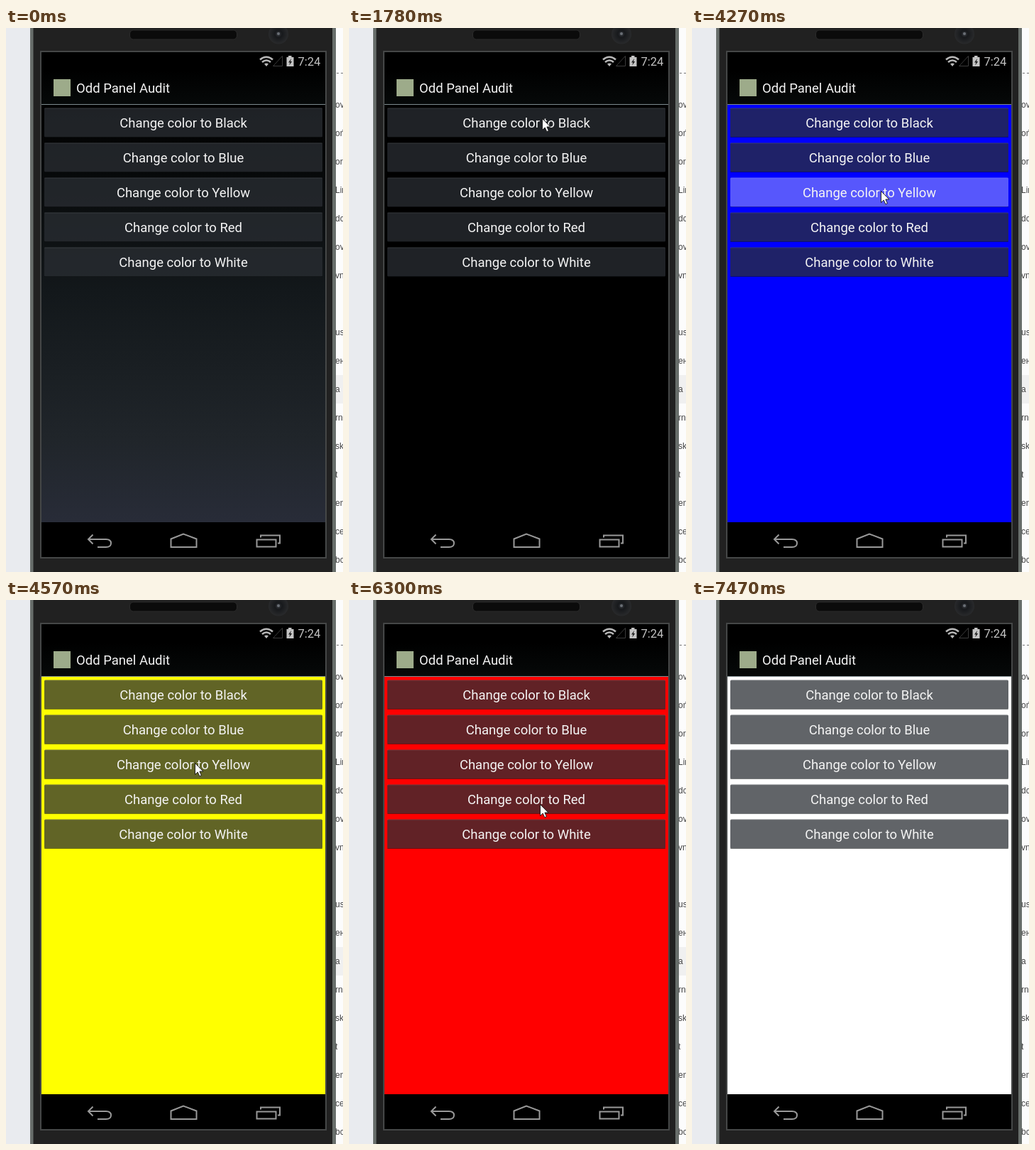
An HTML page that plays this animation: 475 by 765 pixels, repeating every 8380 ms.

```html
<!DOCTYPE html>
<html lang="en">
<head>
<meta charset="utf-8">
<title>Screen colour check</title>
<style>
  html, body { margin: 0; width: 100%; height: 100%; overflow: hidden; background: #e9ebef; }
  svg { display: block; width: 475px; height: 765px; }
  .ui { font-family: Roboto, "Noto Sans", sans-serif; font-size: 18.5px; fill: #f4f4f4; }
  .side { font-family: "Liberation Sans", Arial, sans-serif; font-size: 12px; fill: #444; }
  .nav { fill: none; stroke: #999; stroke-width: 2; }
</style>
</head>
<body>
<svg viewBox="0 0 475 765">
  <defs>
    <linearGradient id="night" x1="0" y1="0" x2="0" y2="1">
      <stop offset="0" stop-color="#000"/>
      <stop offset=".45" stop-color="#13181b"/>
      <stop offset=".8" stop-color="#20252a"/>
      <stop offset="1" stop-color="#282c38"/>
    </linearGradient>
    <linearGradient id="bar" x1="0" y1="0" x2="0" y2="1">
      <stop offset="0" stop-color="#000"/>
      <stop offset="1" stop-color="#060909"/>
    </linearGradient>
    <radialGradient id="lens">
      <stop offset="0" stop-color="#3a3d42"/>
      <stop offset=".35" stop-color="#17191c"/>
      <stop offset="1" stop-color="#292a2c"/>
    </radialGradient>
  </defs>

  <rect width="475" height="765" fill="#e9ebef"/>
  <rect x="460" width="15" height="765" fill="#fcfcfc"/>
  <rect id="row" x="460" y="488" width="15" height="40" fill="#f0f0f0"/>
  <path d="M466 63.5h3m3 0h3" stroke="#777"/>
  <g id="side" class="side"></g>

  <!-- phone body -->
  <rect x="34" width="431" height="765" fill="#686e6b"/>
  <rect x="38.5" width="421.5" height="765" fill="#212121"/>
  <rect x="174.5" y="3" width="151" height="13" rx="5" fill="#0b0b0b" stroke="#2b2b2b"/>
  <circle cx="384" cy="8.500" r="14" fill="url(#lens)"/>
  <circle cx="384" cy="8" r="2" fill="#6b7077"/>
  <rect x="49" y="33" width="402" height="712" fill="#000" stroke="#454747" stroke-width="2"/>

  <!-- status bar -->
  <g fill="none" stroke="#b8b8b8" stroke-width="2.6">
    <path d="M358 44.500q9-7.500 18 0M361 48q6-5 12 0"/>
    <path d="M364 50.500q3-2 6 0l-3 3.500z" fill="#b8b8b8" stroke="none"/>
    <path d="M389.500 39.500v14h-13z" stroke="#3b3b3b" stroke-width="1"/>
  </g>
  <path d="M398 39h4.500v2h3v13h-10v-13h2.500z" fill="#c4c4c4"/>
  <path d="M402 43l-4 5.500h2.200l-1 4 4-5.500h-2.200z" fill="#222"/>
  <text class="ui" x="411.500" y="53" style="font-size:16.500px;fill:#c4c4c4">7:24</text>

  <!-- title bar -->
  <rect x="50" y="60" width="400" height="47" fill="url(#bar)"/>
  <rect x="67" y="72" width="24" height="24" fill="#9dab8a"/>
  <text class="ui" x="99" y="91">Odd Panel Audit</text>

  <rect id="panel" x="50" y="108" width="400" height="587"/>
  <rect x="50" y="107" width="400" height="1" fill="#7d8a8e"/>
  <g id="buttons"></g>

  <!-- navigation -->
  <g class="nav">
    <path d="M122.500 712.500l-6.500 6.500 6.500 6.500M116 719h25q7 0 7 5.500t-7 5.500h-12"/>
    <path d="M232.500 718.500l17.500-7 18.500 7v11.500h-36z"/>
    <path d="M353.500 719.500h27v10h-27zM359 716.500v-3h27v11h-3"/>
  </g>

  <path id="cursor" d="M.5 .5v16l3.700-3.500 2.600 5.700 2.600-1.100-2.500-5.600h5z"
        fill="#fff" stroke="#151515" stroke-width=".9"/>
</svg>
<script>
const LOOP = 8380;
const $ = id => document.getElementById(id);

function add(parent, tag, attrs, text = '') {
  const el = document.createElementNS('http://www.w3.org/2000/svg', tag);
  for (const key in attrs) el.setAttribute(key, attrs[key]);
  el.textContent = text;
  return parent.appendChild(el);
}

const fragments = ['ov', 'oń', 'orc', 'Lin', 'do', 'ov', 'vn', '', 'us', 'ен', 'a', 'rn', 'sk', 't', 'en', 'ce', 'bo'];
fragments.forEach((text, i) => add($('side'), 'text', { x: 464, y: 112 + i * 40 }, text));

const BUTTON = 'rgba(42,47,52,.74)';
const PRESSED = 'rgba(240,240,246,.36)';
const buttons = ['Black', 'Blue', 'Yellow', 'Red', 'White'].map((name, i) => {
  const y = 112 + i * 49, group = $('buttons');
  const face = add(group, 'rect', { x: 54, y: y + .5, width: 392, height: 41, rx: 1.5 });
  add(group, 'rect', { x: 54, y: y + .5, width: 392, height: 1, fill: 'rgba(255,255,255,.1)' });
  add(group, 'rect', { x: 54, y: y + 41, width: 392, height: 1, fill: 'rgba(0,0,0,.3)' });
  add(group, 'text', { class: 'ui', x: 250, y: y + 27.5, 'text-anchor': 'middle' }, 'Change color to ' + name);
  return face;
});

const panelColors = [
  [0, 'url(#night)'], [1780, '#000'], [2930, '#00f'],
  [4570, '#ff0'], [5670, '#f00'], [7160, '#fff']
];
const presses = [[1460, 1780, 0], [4270, 4570, 2]];

const soft = p => (p + p * p * (3 - 2 * p)) / 2;
const moves = [
  { start: 230, end: 1000, steps: 11, from: [401, 752], to: [272, 127], enters: true },
  { start: 2240, end: 2720, steps: 7, from: [272, 127], to: [259, 174] },
  { start: 3480, end: 4130, steps: 9, from: [259, 174], to: [266, 229] },
  { start: 4970, end: 5520, steps: 8, from: [266, 229], to: [269, 282] },
  { start: 6300, end: 6840, steps: 8, from: [269, 282], to: [273, 340] },
  { start: 7237, end: 7392, steps: 3, from: [273, 340], to: [455, 744] }
];
const CURSOR_GONE = 7470;

// The pointer advances in discrete samples, as a screen recording does.
function cursorAt(t) {
  const move = moves.filter(m => t >= m.start).pop();
  if (!move || t >= CURSOR_GONE) return null;
  const { start, end, steps, from, to, enters } = move;
  const sample = Math.min(steps - 1, Math.floor((t - start + 4) * (steps - 1) / (end - start)));
  const p = soft(enters ? sample / (steps - 1) : (sample + 1) / steps);
  return from.map((v, i) => Math.round(v + (to[i] - v) * p));
}

function draw(t) {
  $('panel').setAttribute('fill', panelColors.filter(([at]) => t >= at).pop()[1]);
  const press = presses.find(([from, to]) => t >= from && t < to);
  buttons.forEach((face, i) => face.setAttribute('fill', press && press[2] === i ? PRESSED : BUTTON));
  $('row').setAttribute('visibility', t < CURSOR_GONE ? 'visible' : 'hidden');
  const tip = cursorAt(t);
  $('cursor').setAttribute('visibility', tip ? 'visible' : 'hidden');
  if (tip) $('cursor').setAttribute('transform', `translate(${tip})`);
}

const began = performance.now();
function tick() {
  draw((performance.now() - began) % LOOP);
  requestAnimationFrame(tick);
}
tick();
</script>
</body>
</html>
```
